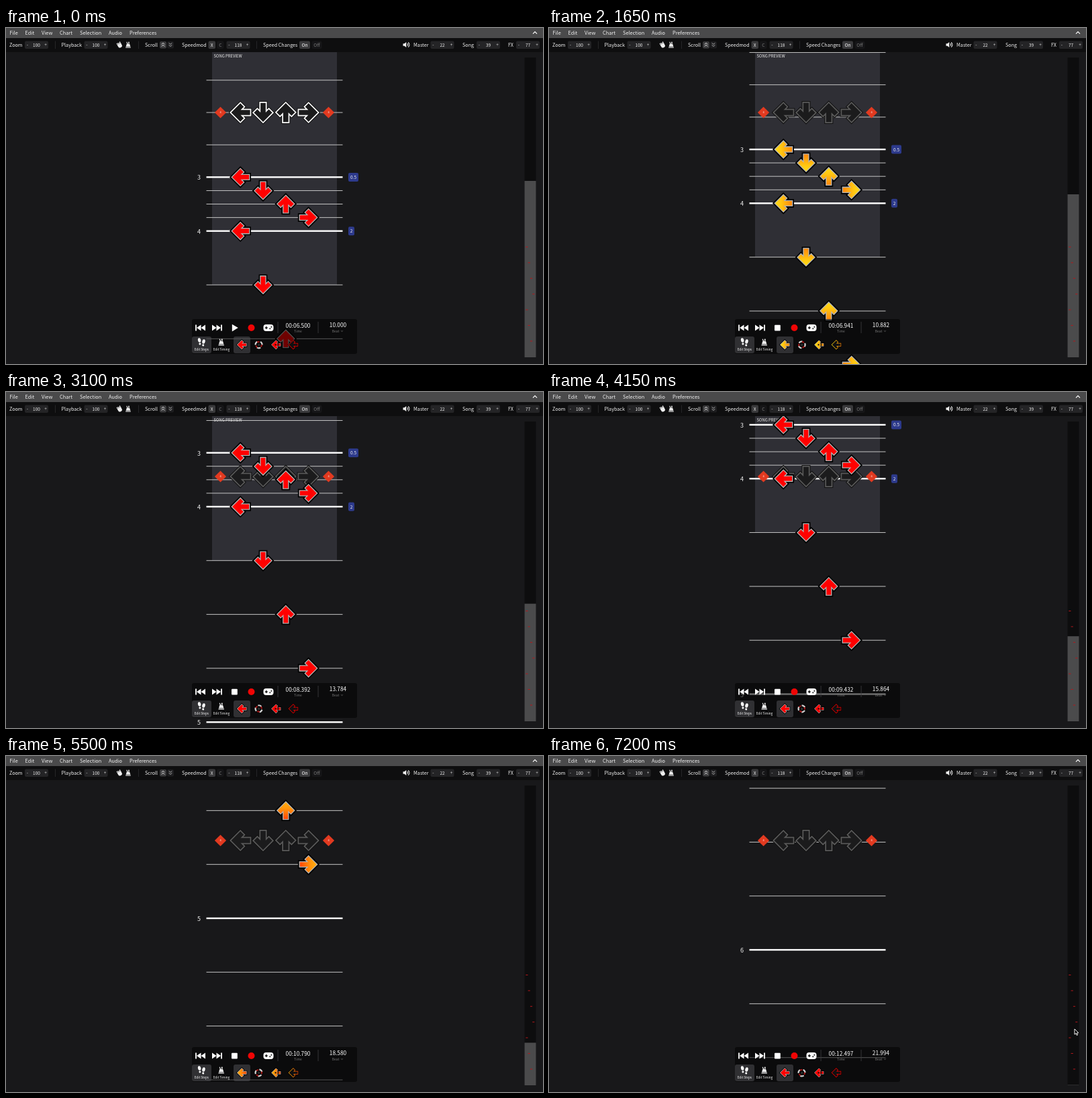
These frames come from a looping animation (800x501 px, 7.25 s). An HTML page with a canvas:

```html
<!DOCTYPE html>
<html lang="en">
<head>
<meta charset="utf-8">
<title>Step editor playback</title>
<style>
html, body { margin: 0; width: 100%; height: 100%; overflow: hidden; background: #18181a; }
canvas { display: block; width: 800px; height: 501px; }
</style>
</head>
<body>
<canvas id="stage"></canvas>
<script>
const W = 800, H = 501, LOOP = 7250, STEP = 50;
const canvas = document.getElementById('stage');
const ratio = window.devicePixelRatio || 1;
canvas.width = W * ratio;
canvas.height = H * ratio;
const c = canvas.getContext('2d');
const FONT = '"Noto Sans CJK JP", "Noto Sans CJK SC", "Noto Sans CJK", "Open Sans", sans-serif';

const RECEPTOR_Y = 126, UNIT = 40.16;
const LANES = [349.4, 383, 416.8, 450.5];
const TURNS = [0, -Math.PI / 2, Math.PI / 2, Math.PI]; // left, down, up, right
const FIRST_NOTE = 12, LAST_NOTE = 19, PREVIEW_END = 17;

// Loop time in ms -> song time in s
const CLOCK = [[1209, 6.5], [1650, 6.941], [3100, 8.392], [4150, 9.432],
  [4900, 10.186], [6100, 11.394], [7200, 12.497]];

function songTime(t) {
  if (t <= CLOCK[0][0]) return CLOCK[0][1];
  let i = 1;
  while (i < CLOCK.length - 1 && t > CLOCK[i][0]) i++;
  const [t0, s0] = CLOCK[i - 1], [t1, s1] = CLOCK[i];
  return s0 + (s1 - s0) * (t - t0) / (t1 - t0);
}

// Scroll rate is 1.2 up to beat 12, 0.5 up to beat 16, then 2
function scroll(beat) {
  return UNIT * (1.2 * Math.min(beat, 12) +
    0.5 * Math.min(Math.max(beat - 12, 0), 4) + 2 * Math.max(beat - 16, 0));
}

const clamp = v => Math.max(0, Math.min(1, v));

function text(s, x, y, size, color = '#f2f2f2', align = 'left') {
  c.font = size + 'px ' + FONT;
  c.textAlign = align;
  c.fillStyle = color;
  c.fillText(s, x, y + size * 0.36);
}

function rect(x, y, w, h, color) {
  c.fillStyle = color;
  c.fillRect(x, y, w, h);
}

function box(x, y, w, h, r, color) {
  c.beginPath();
  c.roundRect(x, y, w, h, r);
  c.fillStyle = color;
  c.fill();
}

function disc(x, y, r, color) {
  c.beginPath();
  c.arc(x, y, r, 0, 7);
  c.fillStyle = color;
  c.fill();
}

function trace(points, close = true) {
  c.beginPath();
  points.forEach(([x, y]) => c.lineTo(x, y));
  if (close) c.closePath();
}

function poly(points, color) {
  trace(points);
  c.fillStyle = color;
  c.fill();
}

function line(points, color, width) {
  trace(points, false);
  c.strokeStyle = color;
  c.lineWidth = width;
  c.stroke();
}

function at(x, y, angle, scale, draw) {
  c.save();
  c.translate(x, y);
  c.rotate(angle);
  c.scale(scale, scale);
  draw();
  c.restore();
}

const ARROW = [[-12.3, 0], [-0.2, -12.1], [4.3, -7.6], [0.1, -3.4], [12.6, -3.4],
  [12.6, 3.4], [0.1, 3.4], [4.3, 7.6], [-0.2, 12.1]];

function outline(color, width) {
  trace(ARROW);
  c.strokeStyle = color;
  c.lineWidth = width;
  c.stroke();
}

// 0 is red, 0.5 orange, 1 yellow
function heat(v) {
  v = clamp(v);
  return `rgb(255,${Math.round(v < 0.5 ? v * 260 : 130 + (v - 0.5) * 180)},${Math.round(v * 20)})`;
}

function glow(beat) {
  return (1 + Math.cos(Math.PI * (beat - 0.9))) / 2;
}

function skin(beat) {
  const v = glow(beat), g = c.createLinearGradient(-12, 0, 12, 0);
  g.addColorStop(0, heat(v));
  g.addColorStop(0.35, heat(v - 0.12));
  g.addColorStop(1, heat(v - 0.45));
  return g;
}

function note(lane, y, beat) {
  at(LANES[lane], y, TURNS[lane], 1, () => {
    outline('#000', 6);
    outline('#b4b4b4', 2.6);
    poly(ARROW, skin(beat));
  });
}

function receptors(beat) {
  const flash = Math.max(0, 1 - (beat % 1) / 0.5);
  const v = Math.round(90 + 165 * flash);
  LANES.forEach((x, i) => at(x, RECEPTOR_Y, TURNS[i], 1.13, () => {
    outline('#111', 4.8);
    outline(`rgb(${v},${v},${v})`, 3);
    poly(ARROW, '#1b1b1c');
  }));
  for (const x of [319.5, 480.5]) {
    const r = 8.6, y = RECEPTOR_Y;
    poly([[x - r, y], [x, y - r], [x + r, y], [x, y + r]], '#e23a20');
    text('4', x, y, 4, '#fff', 'center');
  }
}

function field(beat) {
  const yOf = b => RECEPTOR_Y + scroll(b) - scroll(beat);
  const end = yOf(PREVIEW_END);
  if (end > 36) {
    rect(307, 36, 186, end - 36, '#2f2f35');
    text('SONG PREVIEW', 309.5, 41.5, 5.9);
  }
  for (let b = 8; b < 28; b++) {
    const y = yOf(b);
    if (y < 20 || y > 520) continue;
    if (b % 4) {
      rect(298.5, y - 0.5, 203, 1, '#c4c4c4');
    } else {
      rect(298.5, y - 1.2, 203, 2.4, '#fff');
      text(b / 4, 290, y + 0.8, 9, '#f4f4f4', 'right');
    }
    if (b === 12 || b === 16) {
      const wide = b === 12;
      box(510, y - 6.5, wide ? 15 : 9, 13, 2, '#2d3a8c');
      text(wide ? '0.5' : '2', wide ? 517.5 : 514.5, y + 0.2, 6.6, '#eee', 'center');
    }
  }
  receptors(beat);
  for (let b = FIRST_NOTE; b <= LAST_NOTE; b++) note(b % 4, yOf(b), beat);
}

function stepper(x, value) {
  box(x, 19.5, 35, 11.5, 2, '#242426');
  text('-', x + 4, 25, 6.5, '#ddd', 'center');
  text(value, x + 17.5, 25.2, 6.5, '#f2f2f2', 'center');
  text('+', x + 31, 25, 6.5, '#ddd', 'center');
}

function chevrons(x, dir, color) {
  for (const d of [-1.6, 1.4])
    line([[x - 2.4, 25 + d + dir], [x, 25 + d - dir], [x + 2.4, 25 + d + dir]], color, 1);
}

function clapIcon(x, y) {
  at(x, y, -0.5, 1, () => {
    box(-3, -1.5, 6, 6, 2.5, '#eee');
    for (let i = 0; i < 4; i++) box(-3 + i * 1.6, -4 + (i % 3) * 0.4, 1.2, 5, 0.6, '#eee');
  });
}

function metronome(x, y, s) {
  at(x, y, 0, s, () => {
    poly([[-2.2, -1.5], [2.2, -1.5], [3.6, 3], [-3.6, 3]], '#eee');
    rect(-4, 3.6, 8, 1.2, '#eee');
    line([[0, 1], [-2.4, -4.5]], '#eee', 1.1);
    rect(0.2, -4.6, 1.6, 2.6, '#eee');
  });
}

function topBars() {
  rect(0, 15, W, 21, '#0e0e0f');
  rect(0, 0, W, 15, '#4a4a4b');
  const menu = [['File', 5.5], ['Edit', 28.5], ['View', 53], ['Chart', 80],
    ['Selection', 110], ['Audio', 153], ['Preferences', 184]];
  menu.forEach(([s, x]) => text(s, x, 7.8, 7.4));
  line([[785, 8.6], [788, 5.6], [791, 8.6]], '#fff', 1.2);

  const labels = [['Zoom', 5], ['Playback', 82.5], ['Scroll', 207], ['Speedmod', 262],
    ['Speed Changes', 383], ['Master', 607], ['Song', 680], ['FX', 748]];
  labels.forEach(([s, x]) => text(s, x, 25.3, 7.2));
  const fields = [[28, 100], [116.5, 100], [328.5, 118], [632.5, 22], [701, 39], [760, 77]];
  fields.forEach(([x, v]) => stepper(x, v));
  for (const x of [73, 197, 373]) rect(x, 19.5, 0.8, 11.5, '#2c2c2e');

  clapIcon(169, 25);
  metronome(182, 25, 0.95);
  box(229, 20, 10, 10.5, 2, '#3a3a3c');
  box(240, 20, 10, 10.5, 2, '#1d1d1f');
  chevrons(234, 1, '#ddd');
  chevrons(245, -1, '#aaa');
  box(301.5, 19.5, 10.5, 11.5, 2, '#3a3a3c');
  text('X', 306.7, 25.2, 6.6, '#eee', 'center');
  box(314, 19.5, 10.5, 11.5, 2, '#161618');
  text('C', 319.3, 25.2, 6.6, '#777', 'center');
  box(437, 19.5, 16, 11.5, 2, '#3a3a3c');
  text('On', 445, 25.2, 6.8, '#fff', 'center');
  box(455.5, 19.5, 15, 11.5, 2, '#161618');
  text('Off', 463, 25.2, 6.8, '#777', 'center');

  poly([[591.5, 23.3], [593.5, 23.3], [596.3, 21], [596.3, 29], [593.5, 26.7], [591.5, 26.7]], '#eee');
  c.strokeStyle = '#eee';
  c.lineWidth = 1.1;
  for (const r of [2.1, 4.3]) {
    c.beginPath();
    c.arc(596.6, 25, r, -0.95, 0.95);
    c.stroke();
  }
}

function scrubber(beat) {
  rect(772.5, 44, 17, 447, '#0d0d0e');
  const y = Math.min(490.5, 228 + 23.32 * (beat - 10));
  rect(772.5, y, 17, 491 - y, '#4b4b4c');
  for (let i = 0; i < 7; i++) rect(774.3 + (i % 4) * 3.3, 326 + i * 23.4, 3.2, 1, '#b3171b');
}

function skipIcon(x, y, dir) {
  at(x, y, dir < 0 ? Math.PI : 0, 1, () => {
    poly([[-7.5, -4.5], [-1, 0], [-7.5, 4.5]], '#fff');
    poly([[-1, -4.5], [5.5, 0], [-1, 4.5]], '#fff');
    rect(5.6, -4.5, 1.8, 9, '#fff');
  });
}

function gamepad(x, y) {
  box(x - 7.5, y - 5, 15, 10, 4, '#fff');
  rect(x - 5.2, y - 0.7, 4, 1.4, '#111');
  rect(x - 3.9, y - 2, 1.4, 4, '#111');
  disc(x + 2.3, y + 1.3, 1, '#111');
  disc(x + 4.4, y - 1.3, 1, '#111');
}

function footsteps(x, y) {
  for (const [dx, dy, a] of [[-2.9, -1, -0.15], [2.9, 1, 0.15]]) {
    at(x + dx, y + dy, a, 1, () => {
      c.beginPath();
      c.ellipse(0, -2, 2.2, 3.2, 0, 0, 7);
      c.fillStyle = '#fff';
      c.fill();
      box(-1.5, 2, 3, 3, 1.4, '#fff');
    });
  }
}

function mine(x, y, beat) {
  disc(x, y, 6.6, '#050505');
  c.lineWidth = 2.2;
  for (let i = 0; i < 6; i++) {
    const a = beat * Math.PI + Math.PI / 2 - 0.55 + i * Math.PI / 3;
    c.beginPath();
    c.arc(x, y, i % 2 ? 4.4 : 5, a, a + (i % 2 ? 0.8 : 1.15));
    c.strokeStyle = i % 2 ? '#a01818' : '#d0d0d0';
    c.stroke();
  }
  disc(x, y, 1.9, '#2a2a2a');
}

function panel(time, beat, seen, playing) {
  box(277, 434, 246, 52, 3, 'rgba(2,2,3,.57)');
  skipIcon(289.5, 447, -1);
  skipIcon(314.5, 447, 1);
  if (playing) box(336, 442.7, 8.8, 8.8, 1, '#fff');
  else poly([[336.8, 441.7], [345.8, 447], [336.8, 452.4]], '#fff');
  disc(365.5, 447, 5, '#f00505');
  gamepad(391, 447);
  for (const x of [404.6, 464.6]) rect(x, 438, 0.9, 17, '#3a3a3c');
  text('00:' + time.toFixed(3).padStart(6, '0'), 435, 443.8, 8.3, '#fff', 'center');
  text('Time', 435, 452.2, 5, '#777', 'center');
  text(beat.toFixed(3), 494.5, 443.4, 8.3, '#fff', 'center');
  text('Beat', 491, 452, 5, '#777', 'center');
  line([[499, 451.2], [500.5, 452.6], [502, 451.2]], '#777', 0.7);

  const lit = 'rgba(80,80,84,.55)';
  box(277, 460, 29, 25, 3, lit);
  footsteps(291.3, 468.5);
  text('Edit Steps', 291.3, 479.3, 4.6, '#fff', 'center');
  metronome(320.7, 468.4, 1.05);
  text('Edit Timing', 320.9, 479.3, 4.6, '#fff', 'center');
  box(339, 460, 25, 25, 3, lit);

  at(351.3, 472.3, 0, 0.52, () => {
    outline('#000', 6);
    outline('#b4b4b4', 2.8);
    poly(ARROW, skin(seen));
  });
  mine(376.6, 472.3, seen);
  at(402.3, 472.3, 0, 0.52, () => {
    outline('#000', 6);
    outline('#999', 2.4);
    poly(ARROW, skin(seen));
    rect(-3.5, -2, 4, 4, '#111');
    rect(4.5, -4, 3, 8, '#111');
  });
  at(428, 472.3, 0, 0.52, () => {
    outline('#000', 5);
    outline(skin(seen), 2.6);
    poly(ARROW, '#101011');
  });
}

function pointer(t) {
  if (t < 7000) return;
  const k = clamp((t - 7000) / 200), ease = 1 - (1 - k) * (1 - k);
  at(801 - 18 * ease, 414 - 7 * ease, 0, 0.86, () => {
    trace([[0, 0], [0, 9.5], [2.3, 7.5], [3.8, 11], [5.4, 10.3], [3.9, 7], [6.8, 6.8]]);
    c.fillStyle = '#000';
    c.fill();
    c.strokeStyle = '#fff';
    c.lineWidth = 1.1;
    c.stroke();
  });
}

function draw(t) {
  const time = songTime(t), beat = 10 + (time - 6.5) * 2;
  const seen = Math.max(10, beat - 0.024); // the view trails the clock slightly
  c.setTransform(ratio, 0, 0, ratio, 0, 0);
  rect(0, 0, W, H, '#18181a');
  field(seen);
  topBars();
  scrubber(seen);
  panel(time, beat, seen, t > CLOCK[0][0]);
  pointer(t);
}

const start = performance.now();
function tick() {
  const t = (performance.now() - start) % LOOP;
  draw(Math.floor(t / STEP) * STEP);
  requestAnimationFrame(tick);
}
tick();
</script>
</body>
</html>
```
